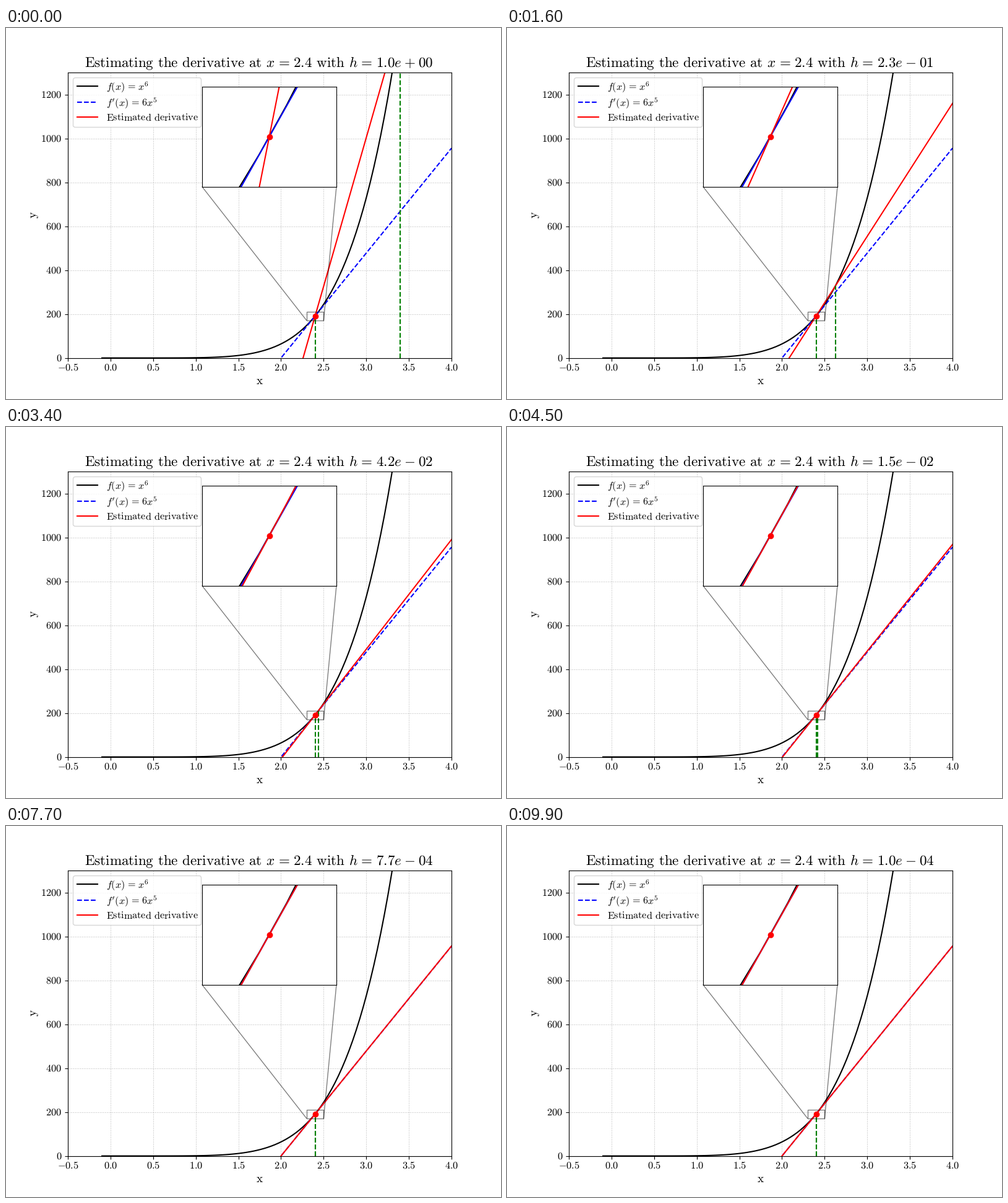
Recreate the animation shown at these times as a matplotlib script. Size 800 by 600 pixels, loop 10000 ms.

```python
import numpy as np
import matplotlib.pyplot as plt
from matplotlib.animation import FuncAnimation
from matplotlib.lines import Line2D
from matplotlib.patches import FancyBboxPatch
from matplotlib.transforms import Affine2D

W, H = 800, 600
FRAMES, INTERVAL = 100, 100
X0 = 2.4
STEPS = np.logspace(0, -4, FRAMES)

plt.rcParams["mathtext.fontset"] = "cm"
plt.rcParams["text.hinting"] = "none"

EQ = r"\hspace{0.12}=\hspace{0.12}"
SPACE = r"\hspace{0.38}"


def f(x):
    return x**6


def roman(text):
    return SPACE.join(rf"\mathrm{{{word}}}" for word in text.split())


def title_text(h):
    mantissa, exponent = f"{h:.1e}".split("e")
    sign, digits = exponent[0], exponent[1:]
    number = rf"{mantissa}e\hspace{{0.05}}{sign}\hspace{{0.05}}{digits}"
    parts = [roman("Estimating the derivative at"), f"x{EQ}{X0}",
             roman("with"), f"h{EQ}{number}"]
    return f"${SPACE.join(parts)}$"


def secant(h):
    slope = (f(X0 + h) - f(X0)) / h
    return f(X0) + slope * (xs - X0)


xs = np.linspace(-0.1, 4, 100)
tangent = f(X0) + 6 * X0**5 * (xs - X0)

fig, ax = plt.subplots(figsize=(W / 100, H / 100), dpi=100)
fig.subplots_adjust(left=0.125, right=0.9, bottom=0.11, top=0.88)
ax.set(xlim=(-0.5, 4), ylim=(-1, 1300))
xticks = np.arange(-0.5, 4.1, 0.5)
yticks = range(0, 1201, 200)
ax.set_xticks(xticks, [f"${x:.1f}$" for x in xticks], fontsize=11.8)
ax.set_yticks(yticks, [f"${y}$" for y in yticks], fontsize=11.8)
ax.tick_params(axis="x", pad=2.8)
ax.grid(ls="--", lw=0.5, alpha=0.7)
title = ax.set_title(title_text(STEPS[0]), fontsize=16.6, x=0.4976, pad=6)

# Pixel coordinates with the origin at the top left
px = Affine2D().scale(1 / W, -1 / H).translate(0, 1) + fig.transFigure


def label(x, y, text, size, **kw):
    fig.text(x, y, f"${text}$", fontsize=size, transform=px,
             va="baseline", **kw)


label(410, 576.5, roman("x"), 13.8, ha="center")
label(49, 302, roman("y"), 13.8, ha="center",
      rotation=90, rotation_mode="anchor")

# Main plot
ax.plot(xs, f(xs), "k")
ax.plot(xs, tangent, "b--")
red, = ax.plot(xs, secant(STEPS[0]), "r")
ax.plot([X0, X0], [0, f(X0)], "--", color="green")
marker, = ax.plot([], [], "--", color="green")
ax.plot(X0, f(X0), "ro", zorder=5)

# Zoomed inset
inset = ax.inset_axes([0.35, 0.6, 0.35, 0.35])
inset.set(xlim=(X0 - 0.1, X0 + 0.1), ylim=(f(X0) - 20, f(X0) + 20),
          xticks=[], yticks=[])
inset.plot(xs, f(xs), "k")
inset.plot(xs, tangent, "b")
inset_red, = inset.plot(xs, secant(STEPS[0]), "r")
inset.plot(X0, f(X0), "ro", zorder=5)
ax.indicate_inset_zoom(inset, edgecolor="black")

# Legend
fig.add_artist(FancyBboxPatch(
    (108.33, 80.33), 207, 79.9, boxstyle="round,pad=0,rounding_size=0.2",
    mutation_scale=16.67, fc="white", ec="0.8", alpha=0.8, lw=1,
    snap=True, transform=px))
entries = [
    (94, 100, "black", "-", f"f(x){EQ}x^6"),
    (120, 126, "blue", "--", f"f'(x){EQ}6x^5"),
    (144, 150, "red", "-", roman("Estimated derivative")),
]
for y, base, color, style, text in entries:
    fig.add_artist(Line2D([115, 148.3], [y, y], color=color, ls=style,
                          lw=1.5, transform=px))
    label(161.7, base, text, 11.65)


def update(i):
    h = STEPS[i]
    line = secant(h)
    red.set_ydata(line)
    inset_red.set_ydata(line)
    marker.set_data([X0 + h, X0 + h], [0, f(X0 + h)])
    title.set_text(title_text(h))
    return red, inset_red, marker, title


anim = FuncAnimation(fig, update, frames=FRAMES, interval=INTERVAL,
                     repeat=True, repeat_delay=0)
plt.show()
```
